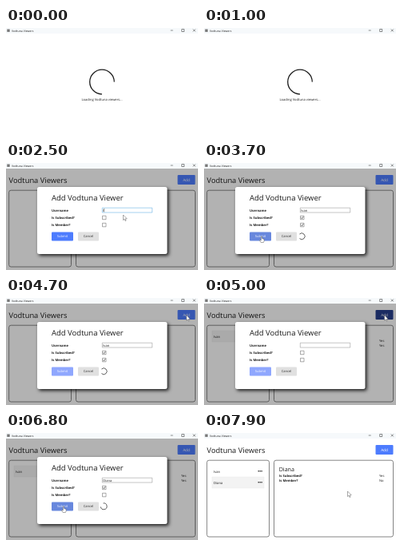
An HTML page with a canvas that plays this animation: 240x134 px, repeating every 8 s.

```html
<!DOCTYPE html>
<html lang="en">
<head>
<meta charset="utf-8">
<title>Vodtuna Viewers</title>
<style>
html, body { margin: 0; width: 100%; height: 100%; overflow: hidden; background: #fff; }
canvas { display: block; width: 240px; height: 134px; }
</style>
</head>
<body>
<canvas></canvas>
<script>
const LOOP = 8000, STEP = 100, LOADED = 1400, CHAR_TIME = 75;
const BLUE = '#4d7cfe', NAVY = '#263f8c', PALE = '#8fa7fe', INK = '#1c1c1c';

// One round of filling in the dialog per viewer, times in ms.
const rounds = [
  { name: 'Ivan', member: true, open: 1900, type: 2500, send: 3700, done: 4800, pick: 4900 },
  { name: 'Diana', member: false, open: 5000, type: 5700, send: 6700, done: 7300, pick: 7500 }
];
rounds.forEach(round => {
  round.tickSubscribed = round.send - 400;
  round.tickMember = round.send - 200;
});

const rowY = index => 41 + index * 14;
const spots = {
  enter: [214, 62], add: [225.5, 21.5], field: [146.5, 65],
  subscribed: [122, 68], member: [122, 77], submit: [72, 92], rest: [179.5, 73]
};

// Arrival times of the mouse at each spot.
const visits = [
  [LOADED + 100, spots.enter],
  [1700, spots.add],
  ...rounds.flatMap((round, i) => [
    [round.open, spots.add],
    [round.type - 300, spots.field],
    [round.tickSubscribed, spots.subscribed],
    ...(round.member ? [[round.tickMember, spots.member]] : []),
    [round.send, spots.submit],
    [round.send + 100, spots.submit],
    [round.send + 400, spots.add],
    [round.done - 100, spots.add],
    [round.pick, [42, rowY(i) + 7]]
  ]),
  [7900, spots.rest]
];

const canvas = document.querySelector('canvas');
const ctx = canvas.getContext('2d');
const scale = window.devicePixelRatio || 1;
canvas.width = 240 * scale;
canvas.height = 134 * scale;

function mouseAt(time) {
  const next = visits.findIndex(([arrival]) => arrival > time);
  if (next === 0) return null;
  if (next < 0) return spots.rest;
  const [left, from] = visits[next - 1], [arrival, to] = visits[next];
  const start = Math.max(left, arrival - 400);
  const k = Math.max(0, (time - start) / (arrival - start));
  const eased = k * k * (3 - 2 * k);
  return from.map((value, axis) => value + (to[axis] - value) * eased);
}

function text(label, x, y, size, { color = INK, bold = false, align = 'left' } = {}) {
  ctx.font = `${bold ? 'bold ' : ''}${size}px "Open Sans", "Noto Sans", sans-serif`;
  ctx.textAlign = align;
  ctx.fillStyle = color;
  ctx.fillText(label, x, y);
  return ctx.measureText(label).width;
}

function box(x, y, w, h, { fill, stroke, radius = 0, width = 0.5 } = {}) {
  ctx.beginPath();
  ctx.roundRect(x, y, w, h, radius);
  if (fill) { ctx.fillStyle = fill; ctx.fill(); }
  if (stroke) { ctx.strokeStyle = stroke; ctx.lineWidth = width; ctx.stroke(); }
}

function line(d, width = 0.5) {
  ctx.strokeStyle = INK;
  ctx.lineWidth = width;
  ctx.stroke(new Path2D(d));
}

function button(label, x, y, w, h, fill, color, size) {
  box(x, y, w, h, { fill, radius: 1 });
  text(label, x + w / 2, y + h / 2 + size * 0.36, size, { color, align: 'center' });
}

function spinner(x, y, radius, width, turn) {
  const start = turn * Math.PI * 2;
  ctx.beginPath();
  ctx.arc(x, y, radius, start, start + Math.PI * 1.5);
  ctx.strokeStyle = INK;
  ctx.lineWidth = width;
  ctx.stroke();
}

function titleBar() {
  box(0, 0, 240, 7, { fill: '#f6f9fb' });
  box(1.3, 1.5, 3.4, 3.4, { fill: '#777' });
  text('Vodtuna Viewers', 7, 4.5, 3.5);
  line('M205.7 3h3');
  line('M219.7 1.5h3v3h-3z');
  line('M233.8 1.5l3 3m0-3l-3 3');
}

function viewerRow(name, y, selected) {
  if (selected) box(10, y, 65, 14, { fill: '#f3f3f3', stroke: '#e2e2e2', width: 0.4 });
  text(name, 12, y + 8.6, 4.2);
  for (let i = 0; i < 3; i++) box(67.4 + i * 1.95, y + 6, 1.6, 1.6, { fill: INK, radius: 0.8 });
}

function mainView(time, hoverAdd) {
  const listed = rounds.filter(round => time >= round.done);
  const viewer = rounds.findLast(round => time >= round.pick);
  const frame = { stroke: '#666', radius: 2.5, width: 0.8 };

  text('Vodtuna Viewers', 3.6, 24.6, 9.35);
  button('Add', 214.5, 15, 22, 12, hoverAdd ? NAVY : BLUE, '#fff', 4.7);
  box(3.7, 34.2, 77.8, 95.8, frame);
  box(87.5, 34.2, 149, 95.8, frame);
  listed.forEach((round, i) => viewerRow(round.name, rowY(i), round === viewer));

  if (!viewer) {
    text('Please select a viewer to see their details!', 94, 45.5, 4.7);
    return;
  }
  text(viewer.name, 93.7, 48, 7.1);
  text('Is Subscribed?', 94, 54.8, 4.1, { bold: true });
  text('Yes', 219, 54.8, 4.1);
  text('Is Member?', 94, 60.7, 4.1, { bold: true });
  text(viewer.member ? 'Yes' : 'No', 219, 60.7, 4.1);
}

function checkBox(y, checked) {
  box(120.5, y, 4.5, 4.5, { fill: '#fff', stroke: '#555' });
  if (checked) line(`M121.4 ${y + 2.3}l1 1.1l1.8 -2.4`, 0.7);
}

function dialog(round, time, hoverSubmit) {
  const typed = time < round.type ? '' : round.name.slice(0, 1 + (time - round.type) / CHAR_TIME);
  const focused = time >= round.type - 300 && time < round.tickSubscribed;
  const sending = time >= round.send;

  box(0, 7, 240, 127, { fill: 'rgba(0,0,0,.3)' });
  ctx.save();
  ctx.shadowColor = 'rgba(0,0,0,.85)';
  ctx.shadowBlur = 4 * scale;
  ctx.shadowOffsetX = ctx.shadowOffsetY = 2 * scale;
  box(39, 30, 162.5, 84, { fill: '#fff', radius: 2.5 });
  ctx.restore();

  text('Add Vodtuna Viewer', 57, 47.2, 9.5);
  ['Username', 'Is Subscribed?', 'Is Member?'].forEach((label, i) =>
    text(label, 57, 60.6 + i * 9.1, 4.1, { bold: true }));
  box(120.3, 56.2, 62.4, 5.8, { fill: '#fff', stroke: focused ? '#4aa3df' : '#888' });
  const width = text(typed, 121.2, 60.6, 4.1);
  if (focused) box(121.4 + width, 57, 0.5, 4.3, { fill: INK });
  checkBox(66.2, time >= round.tickSubscribed);
  checkBox(75.3, round.member && time >= round.tickMember);

  const enabled = typed && !sending;
  const fill = enabled ? (hoverSubmit ? NAVY : BLUE) : (hoverSubmit ? '#6787dd' : PALE);
  button('Submit', 57, 86.5, 27, 11, fill, '#fff', 4.1);
  button('Cancel', 90, 86.5, 26, 11, '#e0e0e0', '#333', 4.1);
  if (sending) spinner(122.2, 91.8, 3.9, 0.7, 0.625 + (time - 4700) / 1000);
}

const arrow = new Path2D('M0 0v6.6l1.5-1.4l1.1 2.4l1-.5l-1-2.2l2.1-.2z');
const hand = new Path2D('M-.7 0h1.2l.1 2.6l2.6 .8v2.2l-.8 1.9h-3.2l-1.8-2.7l.7-.6l1.2 .9z');

function cursor([x, y], shape) {
  ctx.save();
  ctx.translate(x, y);
  ctx.fillStyle = '#fff';
  ctx.strokeStyle = '#555';
  ctx.lineWidth = 0.5;
  ctx.fill(shape);
  ctx.stroke(shape);
  ctx.restore();
}

function draw(time) {
  const mouse = mouseAt(time);
  const round = rounds.find(({ open, done }) => time >= open && time < done);
  const over = (x, y, w, h) => mouse && Math.abs(mouse[0] - x - w / 2) <= w / 2 && Math.abs(mouse[1] - y - h / 2) <= h / 2;
  const hoverAdd = over(214.5, 15, 22, 12) && (!round || time < round.open + STEP);
  const hoverSubmit = round && over(57, 86.5, 27, 11);

  ctx.setTransform(scale, 0, 0, scale, 0, 0);
  ctx.textRendering = 'geometricPrecision';
  box(0, 0, 240, 134, { fill: '#fff' });
  titleBar();
  if (time < LOADED) {
    spinner(120, 67.5, 15.3, 1.3, 0.25 + time / 1000);
    text('Loading Vodtuna viewers...', 120, 91, 4.1, { align: 'center' });
    return;
  }
  mainView(time, hoverAdd);
  if (round) dialog(round, time, hoverSubmit);
  if (mouse) cursor(mouse, hoverSubmit || (hoverAdd && !round) ? hand : arrow);
}

const began = performance.now();
function tick() {
  const elapsed = (performance.now() - began) % LOOP;
  draw(Math.floor(elapsed / STEP) * STEP);
  requestAnimationFrame(tick);
}
tick();
</script>
</body>
</html>
```
